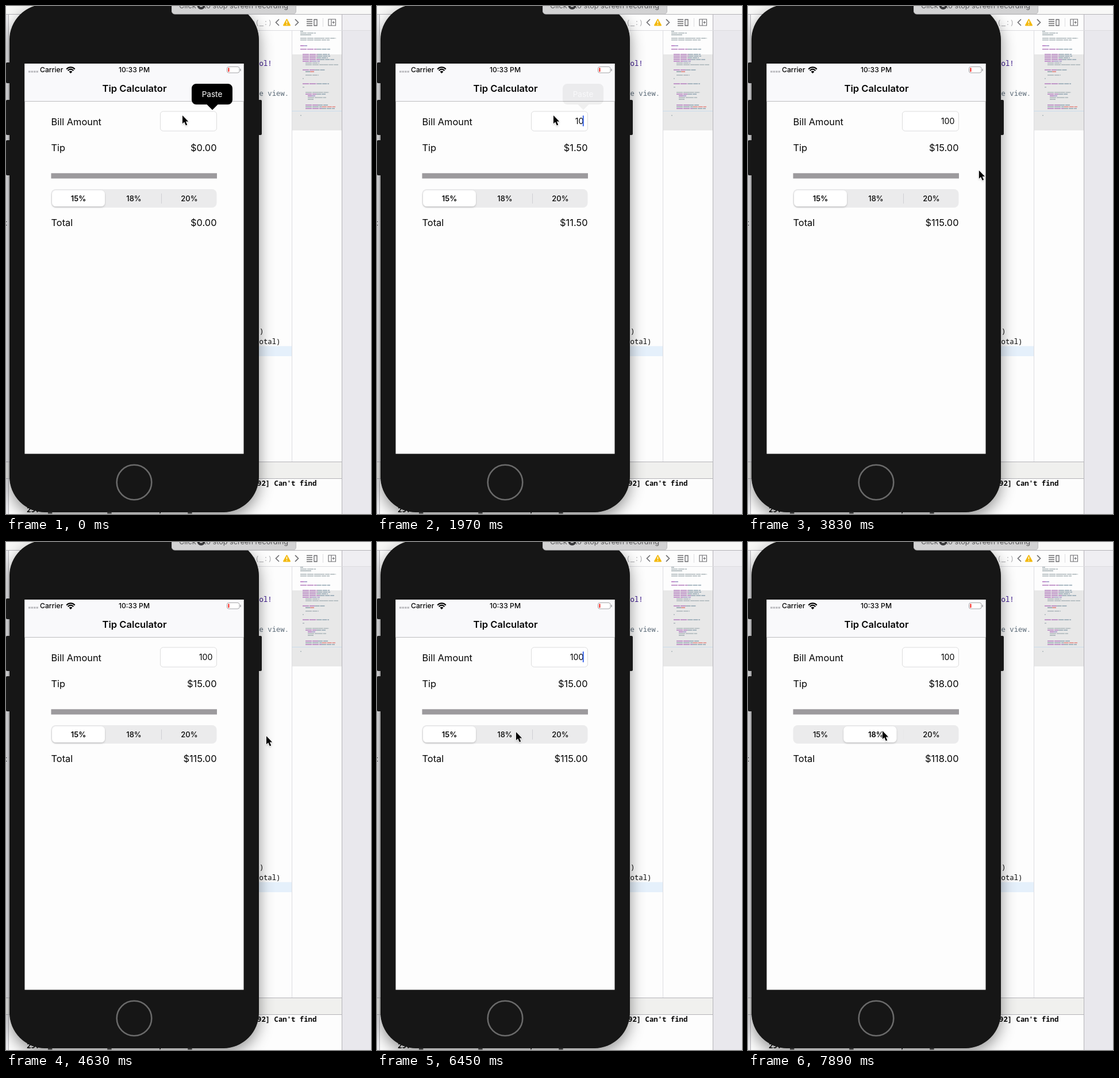
Write an HTML page that moves like this. It is 635 by 882 pixels and loops after 7990 ms.

```html
<!DOCTYPE html>
<html lang="en">
<head>
<meta charset="utf-8">
<title>Tip Calculator</title>
<style>
  html, body { margin: 0; width: 100%; height: 100%; overflow: hidden; background: #fdfdfd; }
  svg { display: block; width: 635px; height: 882px; }
  text { font-family: Inter, "Open Sans", sans-serif; fill: #050505; white-space: pre; }
  .mono { font-family: "Noto Sans Mono", "DejaVu Sans Mono", monospace; font-size: 12.3px; }
  .body { font-size: 16.4px; }
  .end { text-anchor: end; }
  .mid { text-anchor: middle; }
  .seg text { font-size: 13px; font-weight: 500; }
  .seg text.on { font-weight: 600; }
  .line { fill: none; stroke: #6b6b6e; stroke-width: 1.3; }
</style>
</head>
<body>
<svg viewBox="0 0 635 882" xmlns="http://www.w3.org/2000/svg">
  <defs>
    <filter id="phoneShadow" x="-20%" y="-10%" width="140%" height="120%">
      <feDropShadow dx="0" dy="9" stdDeviation="13" flood-color="#000" flood-opacity=".42"/>
    </filter>
    <filter id="softShadow" x="-30%" y="-30%" width="160%" height="180%">
      <feDropShadow dx="0" dy="1.5" stdDeviation="1.6" flood-color="#000" flood-opacity=".2"/>
    </filter>
    <clipPath id="wifiFan"><path d="M112.5 117L102 106.5V103H123V106.5Z"/></clipPath>
  </defs>

  <!-- editor window -->
  <rect width="635" height="882" fill="#fdfdfd"/>
  <rect width="635" height="14" fill="#f8f8f7"/>
  <rect x="585" y="14" width="50" height="868" fill="#e9e8ed"/>
  <rect x="585" y="14" width="50" height="29" fill="#efeef2"/>
  <rect y="14" width="4" height="868" fill="#ececef"/>
  <rect x="430" y="590.5" width="67" height="17.5" fill="#e5f0fb"/>
  <rect x="497" y="84" width="87" height="132" fill="#e8e8e8"/>
  <rect y="791" width="584" height="29" fill="#f0f0ee"/>
  <path d="M0 14.5H635M584.5 14V882M4.5 14V882M0 791.5H584M0 820.5H584" fill="none" stroke="#b4b3b8"/>
  <path d="M400 42.5H635M497.5 43V791" fill="none" stroke="#dcdce0"/>
  <path d="M497 182.5H584" stroke="#c9dcec"/>
  <g id="minimap"></g>

  <text class="mono" x="426" y="33" style="fill:#aaaaad">p(_:)</text>
  <path class="line" d="M475 23L469.500 28.500L475 34M503 23L508.500 28.500L503 34" style="stroke-width:1.6"/>
  <path d="M488.500 23.500L494 33.500H483Z" fill="#f3b90d" stroke="#f3b90d" stroke-width="2" stroke-linejoin="round"/>
  <path d="M488.500 25.500V30M488.500 31.500V33" stroke="#fff" stroke-width="1.4"/>
  <path class="line" d="M523 23.500H533M523 27H533M523 30.500H533M523 34H533M536 23.500H541V34H536Z"/>
  <path d="M551.500 21V36" stroke="#dedee1"/>
  <path class="line" d="M561 23H573.500V34H561ZM566 23V34M567.500 28.500H572M569.700 26.300V30.700" style="stroke-width:1.1"/>

  <text class="mono" x="440.500" y="104" style="fill:#39148b">ol!</text>
  <text class="mono" x="440.500" y="156" style="fill:#5d6c79">e view.</text>
  <text class="mono" x="441" y="569">)</text>
  <text class="mono" x="440.500" y="587">otal)</text>
  <text class="mono" x="437" y="833" style="font-weight:700">92] Can't find</text>
  <text class="mono" x="-5" y="381">t</text>
  <text class="mono" x="36" y="879" style="font-weight:700">25.  _             _           ,      _</text>

  <!-- phone -->
  <g fill="#1d1d1d">
    <rect x="0" y="98" width="9" height="36" rx="2"/>
    <rect x="0" y="163" width="9" height="61" rx="2"/>
    <rect x="0" y="233" width="9" height="61" rx="2"/>
    <rect x="436" y="163" width="9" height="61" rx="2"/>
  </g>
  <rect x="6" y="-3" width="434" height="882" rx="62" fill="#131312" filter="url(#phoneShadow)"/>
  <circle cx="223" cy="827" r="30.300" fill="none" stroke="#6a6a6a" stroke-width="2.600"/>
  <rect x="32.500" y="100" width="381" height="677.500" fill="#fdfdfd"/>
  <rect x="32.500" y="100" width="381" height="65" fill="#f9f9fb"/>
  <path d="M32.500 165.500H413.500" stroke="#bdbdbf"/>

  <!-- status bar -->
  <path d="M39 114H56" stroke="#b9b9bd" stroke-width="3" stroke-dasharray="3.500 1"/>
  <text x="59" y="115" font-size="12.200" font-weight="500">Carrier</text>
  <g clip-path="url(#wifiFan)" fill="none" stroke="#050505" stroke-width="2.200">
    <circle cx="112.500" cy="116" r="9.600"/><circle cx="112.500" cy="116" r="6.100"/>
    <circle cx="112.500" cy="116" r="1.600" stroke-width="3.200"/>
  </g>
  <text class="mid" x="223" y="115" font-size="12.200" font-weight="500">10:33 PM</text>
  <rect x="384.500" y="105.500" width="21.500" height="10.500" rx="3" fill="#fff" stroke="#a5a5a8"/>
  <path d="M408 109V113" stroke="#a5a5a8" stroke-width="1.500"/>
  <rect x="386.300" y="107.300" width="2.200" height="7" rx=".8" fill="#f4312c"/>
  <text class="mid" x="223.500" y="149" font-size="16.600" font-weight="600">Tip Calculator</text>

  <!-- form -->
  <text class="body" x="78.500" y="206.500">Bill Amount</text>
  <rect x="268.500" y="183" width="98" height="34" rx="5" fill="#fff" stroke="#dcdcdd"/>
  <text id="bill" class="end" x="359.500" y="205" font-size="14.200"></text>
  <rect id="caret" x="357.800" y="190" width="2" height="19" rx="1" fill="#3d68e8"/>
  <text class="body" x="78.500" y="251.500">Tip</text>
  <text id="tip" class="body end" x="366.500" y="251.500"></text>
  <rect x="78.500" y="290.300" width="288.500" height="9.200" fill="#9c9a9d"/>
  <g class="seg">
    <rect x="78.500" y="318" width="288" height="32" rx="8" fill="#ebebec"/>
    <path id="divider" d="M270.500 325.500V343" stroke="#cfcfd4"/>
    <rect id="thumb" y="320" width="92" height="28" rx="6.500" fill="#fff" filter="url(#softShadow)"/>
    <text id="rate15" class="mid" x="126" y="339">15%</text>
    <text id="rate18" class="mid" x="222.500" y="339">18%</text>
    <text class="mid" x="319" y="339">20%</text>
  </g>
  <text class="body" x="78.500" y="381.500">Total</text>
  <text id="total" class="body end" x="366.500" y="381.500"></text>

  <g id="menu">
    <path d="M331 135H386A8 8 0 0 1 394 143V163A8 8 0 0 1 386 171H368.500L359 180.500L349.500 171H331A8 8 0 0 1 323 163V143A8 8 0 0 1 331 135Z" fill="#000"/>
    <text class="mid" x="358.500" y="158" font-size="13.600" style="fill:#fff">Paste</text>
  </g>

  <!-- recording hint -->
  <rect x="288.500" y="-20" width="216" height="34" rx="5" fill="#d2d2d3" stroke="#bcbcbe"/>
  <text x="301" y="4" font-size="12.700" style="fill:#555557">Click</text>
  <circle cx="339.500" cy="-1" r="7" fill="#363638"/>
  <rect x="337" y="-3.500" width="5" height="5" fill="#d2d2d3"/>
  <text class="end" x="491" y="4" font-size="12.700" style="fill:#555557">to stop screen recording</text>

  <path id="pointer" d="M0 0V14.300L3.200 11.300L5.800 17.300L8.300 16.200L5.700 10.400H10.200Z" fill="#050505"
        stroke="#fff" stroke-width="1.100" paint-order="stroke" filter="url(#softShadow)"/>
</svg>
<script>
const LOOP = 7990, TAP = 7750;
const $ = id => document.getElementById(id);
const clamp = v => Math.max(0, Math.min(1, v));
const easeInOut = u => u * u * (3 - 2 * u);
const easeOut = u => 1 - (1 - u) ** 3;
const money = v => '$' + v.toFixed(2);

// Minimap rows: y, x, width, palette (g comment, p keyword, c code, r string)
const rows = `44 512 5 g;47 512 27 g;50 512 20 g;56 512 62 g;59 512 51 g;69 512 12 p;75 512 52 c;
84 516 47 c;87 516 48 c;90 516 44 c;93 516 55 c;96 516 30 p;99 521 24 g;102 521 57 g;
111 516 39 c;114 521 15 r;120 521 23 g;126 516 2 g;135 516 46 c;141 516 3 g;150 521 41 g;
153 521 35 c;156 525 13 p;159 525 32 g;162 525 10 g;172 521 40 c;175 521 52 r;178 521 51 c;190 512 2 g`;
const palette = { g: ['#a9b4b8', '#a9b4b8'], p: ['#b87cc4', '#a59bc9'], c: ['#b37bbd', '#8fa3b0'], r: ['#93a5ad', '#e2857f'] };
const bar = (x, y, w, color, dash) =>
  `<path d="M${x} ${y}h${w}" stroke="${color}" stroke-width="1.700" stroke-dasharray="${dash}"/>`;
$('minimap').innerHTML = rows.split(';').map(row => {
  const [y, x, w, kind] = row.trim().split(' ');
  const [first, second] = palette[kind], half = w * 0.55;
  return bar(x, y, half, first, '11 1') + bar(+x + half, y, w - half, second, '8 1');
}).join('');

// Pointer stops: time, x, y
const path = [[0, 307, 190], [3350, 307, 190], [4150, 453, 337], [4800, 453, 337], [5470, 341, 349],
              [6250, 242, 330], [6800, 242, 330], [7300, 234, 328], [LOOP, 234, 328]];
const typed = [[0, ''], [1720, '1'], [1920, '10'], [2200, '100']];

function pointerAt(t) {
  const i = path.findIndex((p, k) => k && t <= p[0]);
  const [t0, x0, y0] = path[i - 1], [t1, x1, y1] = path[i];
  const u = easeInOut((t - t0) / (t1 - t0));
  return [x0 + (x1 - x0) * u, y0 + (y1 - y0) * u];
}

function caretAt(t) {
  if (t > 1720 && t < 2950) return 1;
  const phase = (t % 1000 + 900) % 1000;
  return clamp(phase / 80) * clamp((500 - phase) / 80);
}

function draw(t) {
  const bill = typed.filter(([start]) => t >= start).pop()[1];
  const tapped = t >= TAP;
  const tip = bill * (tapped ? 0.18 : 0.15);
  $('bill').textContent = bill;
  $('tip').textContent = money(tip);
  $('total').textContent = money(+bill + tip);
  $('caret').setAttribute('opacity', caretAt(t));
  $('menu').setAttribute('opacity', Math.max(0, 1 - easeInOut(clamp((t - 1720) / 290))));
  const slide = easeOut(clamp((t - TAP) / 260));
  $('thumb').setAttribute('x', 80 + 95.500 * slide);
  $('divider').setAttribute('opacity', 1 - slide);
  $('rate15').classList.toggle('on', !tapped);
  $('rate18').classList.toggle('on', tapped);
  $('pointer').setAttribute('transform', `translate(${pointerAt(t)})`);
}

const begin = performance.now();
function tick() {
  draw((performance.now() - begin) % LOOP);
  requestAnimationFrame(tick);
}
tick();
</script>
</body>
</html>
```
